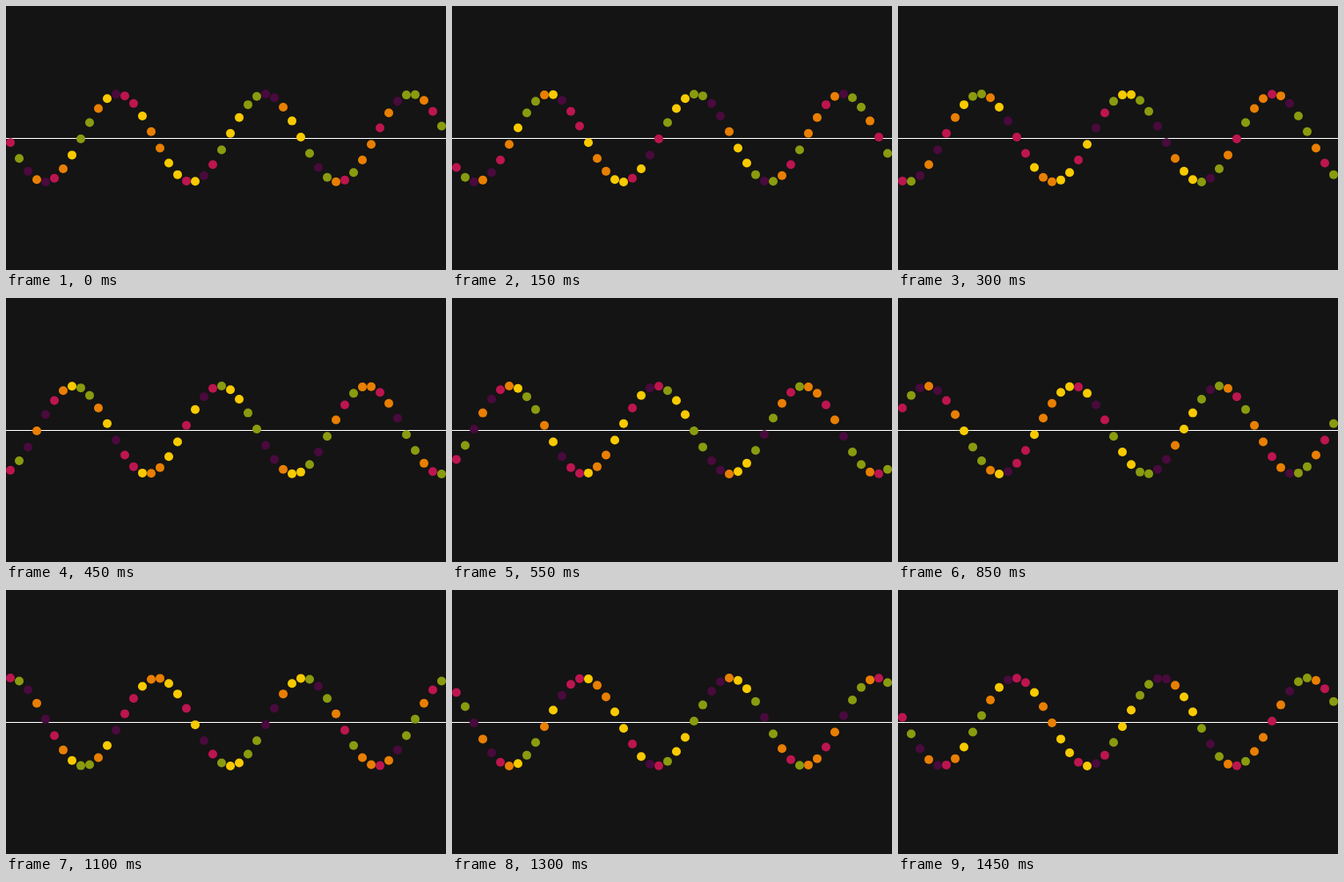
An HTML page with a canvas for the animation above (1.5 s loop, 500x300 px).

```html
<!DOCTYPE html>
<html lang="en">
<head>
<meta charset="utf-8">
<title>Dot wave</title>
<style>
  html, body { margin: 0; width: 100%; height: 100%; overflow: hidden; background: #141414; }
  canvas { display: block; }
</style>
</head>
<body>
<canvas id="stage" width="500" height="300"></canvas>
<script>
const ctx = document.getElementById('stage').getContext('2d');
const STEP_MS = 50, STEPS = 30;
const COUNT = 50, RADIUS = 5, MID = 150, AMP = 50, WAVES = 3;
const COLORS = { D: '#490a3d', P: '#bd1550', O: '#e97f02', Y: '#f8ca00', G: '#8a9b0f' };
const ORDER = 'PGDODPOYGGOYDPPYOOYYPYDPGYYGGDDOYYGDGOPGOOPODGGOPG';

function draw(step) {
  ctx.fillStyle = '#141414';
  ctx.fillRect(0, 0, 500, 300);
  ctx.fillStyle = '#fff';
  ctx.fillRect(0, MID, 500, 1);
  // Half a step of offset keeps the loop symmetric.
  const phase = (step + 0.5) / STEPS;
  for (let i = 0; i < COUNT; i++) {
    const angle = 2 * Math.PI * (WAVES * i / COUNT + phase);
    ctx.fillStyle = COLORS[ORDER[i]];
    ctx.beginPath();
    ctx.arc(RADIUS + 2 * RADIUS * i, MID + AMP * Math.sin(angle), RADIUS, 0, 2 * Math.PI);
    ctx.fill();
  }
}

const start = performance.now();
function tick() {
  const t = performance.now() - start;
  draw(Math.floor(t / STEP_MS) % STEPS);
  requestAnimationFrame(tick);
}
tick();
</script>
</body>
</html>
```
